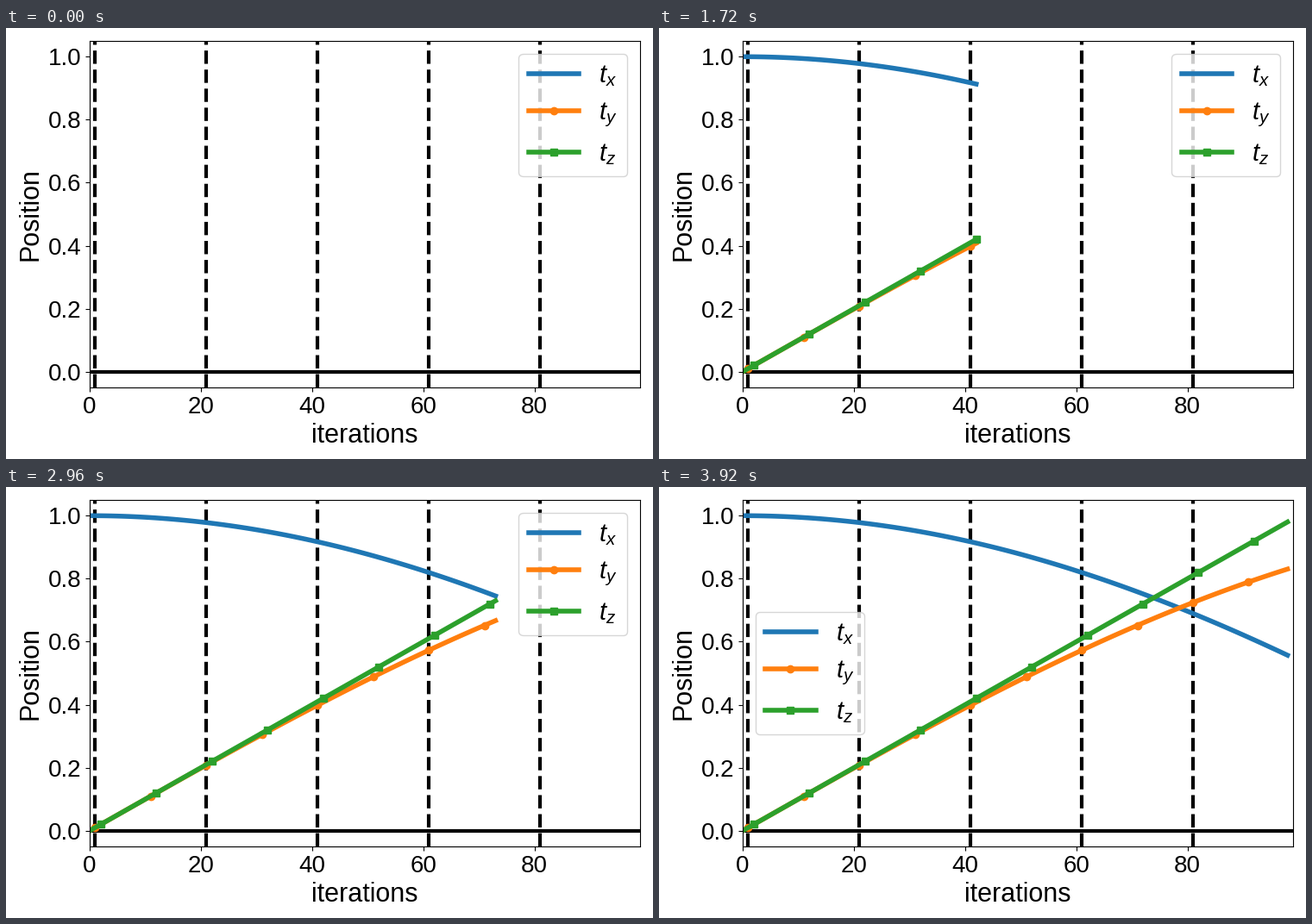
Recreate the animation shown at these times as a matplotlib script. Size 750 by 500 pixels, loop 5960 ms.

```python
import numpy as np
import matplotlib.pyplot as plt
from matplotlib.animation import FuncAnimation

WIDTH, HEIGHT, DPI = 750, 500, 100
LEFT, RIGHT, TOP, BOTTOM = 97, 735, 15, 417
FRAMES, INTERVAL = 149, 40
POINTS = 99

plt.rcParams.update({
    "font.family": "Liberation Sans",
    "mathtext.fontset": "custom",
    "mathtext.rm": "Liberation Sans",
    "mathtext.it": "Liberation Sans:italic",
})

steps = np.arange(POINTS)
angle = 0.01 * steps
curves = [np.cos(angle), np.sin(angle), angle]

fig = plt.figure(figsize=(WIDTH / DPI, HEIGHT / DPI), dpi=DPI)
ax = fig.add_axes([LEFT / WIDTH, 1 - BOTTOM / HEIGHT,
                   (RIGHT - LEFT) / WIDTH, (BOTTOM - TOP) / HEIGHT])
ax.set_xlim(0, POINTS)
ax.set_ylim(-0.05, 1.05)
ax.set_xticks(range(0, 81, 20))
ax.set_yticks(np.linspace(0, 1, 6))
ax.tick_params(labelsize=20)
ax.set_xlabel("iterations", fontsize=22)
ax.set_ylabel("Position", fontsize=22)

for x in range(1, 82, 20):
    ax.axvline(x, color="black", lw=3, ls="--")
ax.axhline(0, color="black", lw=3)

styles = [("$t_x$", "C0", None, None),
          ("$t_y$", "C1", "o", (1, 10)),
          ("$t_z$", "C2", "s", (2, 10))]
lines = [ax.plot([], [], color=color, lw=4, marker=marker,
                 markevery=every, label=label)[0]
         for label, color, marker, every in styles]
legend = ax.legend(loc="upper right", fontsize=21)


def legend_place(last):
    """Keep the legend clear of the growing curves."""
    if last < 78:
        return "upper right"
    return "right" if last < 82 else "center left"


def update(frame):
    # The closing hold shows the complete curves.
    count = frame if frame < POINTS - 1 else POINTS
    for line, values in zip(lines, curves):
        line.set_data(steps[:count], values[:count])
    legend.set_loc(legend_place(count - 1))
    return [*lines, legend]


anim = FuncAnimation(fig, update, frames=FRAMES, interval=INTERVAL,
                     repeat=True, repeat_delay=0, blit=False)
plt.show()
```
